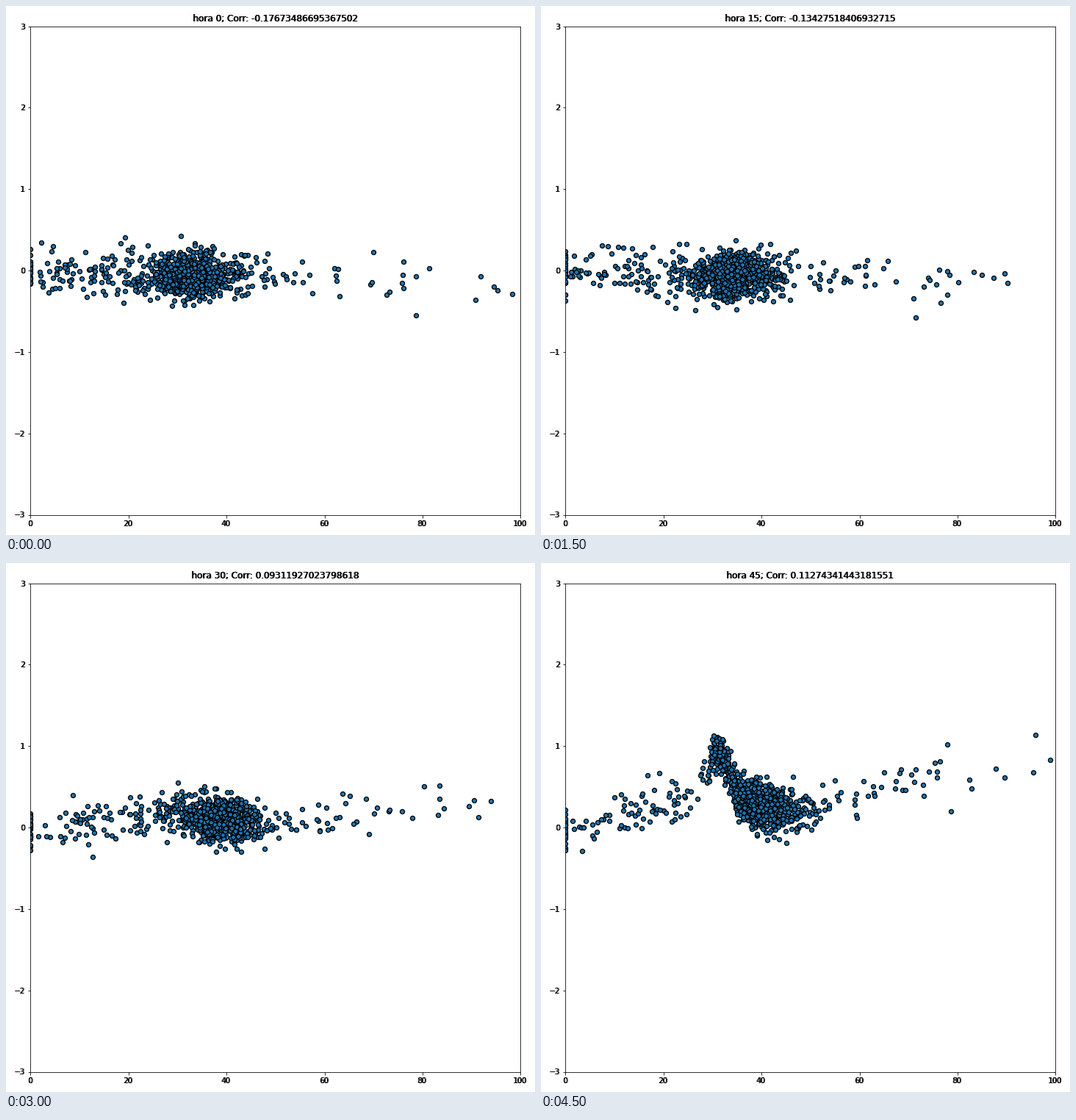
A matplotlib script for the animation above (5000 ms loop, 720 by 720 pixels).

```python
import numpy as np
import matplotlib.pyplot as plt
from matplotlib.animation import FuncAnimation

SIZE = 720
STEP = 5  # hours per picture
BOX = (33.4, 27.5, 667, 665)  # axes in pixels: left, bottom, width, height

CORR = ["-0.17673486695367502", "-0.16284107359214836", "-0.14899592846831902",
        "-0.13427518406932715", "-0.11955476773269091", "-0.01321774837465236",
        "0.09311927023798618", "0.11197137420252709", "0.2743531183376224",
        "0.11274341443181551"]


def ramp(v, start, end):
    """Smooth rise from 0 to 1."""
    u = np.clip((v - start) / (end - start), 0, 1)
    return u * u * (3 - 2 * u)


def cloud(hour):
    rng = np.random.default_rng(40 + hour)
    rise = ramp(hour, 20, 42)   # the whole cloud climbs
    peak = ramp(hour, 25, 45)   # a ridge grows on its left side
    cx = 33 + 6.5 * ramp(hour, 5, 40)
    cy = -0.06 + 0.33 * rise
    peak_x = 31

    def middle(x):
        """Mean height: tilted core, ridge, and tails on both sides."""
        slope = -0.01 * rise * np.clip(x - cx, -8, 10)
        ridge = 0.55 * peak * np.exp(-((x - peak_x) / 3.4) ** 2)
        core = cy + slope + ridge
        tail = -0.1 + rise * (0.5 + 0.014 * (x - 60))
        y = core + (tail - core) * ramp(x, 44, 62)
        return y * np.clip(x / 25, 0, 1)

    groups = [
        (cx + 3.6 * rng.standard_t(5, 740), 0.14),
        (rng.normal(peak_x + 0.8, 1.6, int(130 * peak)), 0.12),
        (1 + 27 * rng.random(115 - hour) ** 0.8, 0.16),
        (42 + 36 * rng.random(42 + hour // 2) ** 1.7, 0.15),
        (rng.uniform(76, 101, 9), 0.15 + 0.1 * rise),
        (np.zeros(24), 0.14),
    ]
    x = np.clip(np.concatenate([g for g, _ in groups]), 0, 100)
    spread = np.concatenate([np.full(len(g), s) for g, s in groups])
    y = middle(x) + spread * rng.standard_normal(len(x))
    return rng.permutation(np.column_stack([x, y]))


def add_axes(shift=0):
    left, bottom, width, height = BOX
    box = np.array([left + shift, bottom, width, height]) / SIZE
    return fig.add_axes(box, xlim=(0, 100), ylim=(-3, 3), facecolor="none")


fig = plt.figure(figsize=(10, 10), dpi=SIZE / 10)
ax = add_axes()
dots = ax.scatter([], [], s=36, c="#1f77b4", edgecolors="black", linewidths=1.3)

# A second set of labels, a pixel aside, makes the lettering heavier
labels = add_axes(-1)
labels.spines[:].set_visible(False)
labels.tick_params(color="none")


def draw(i):
    hour = i * STEP
    dots.set_offsets(cloud(hour))
    for a in (ax, labels):
        a.set_title(f"hora {hour}; Corr: {CORR[i]}")
    return dots, ax.title, labels.title


anim = FuncAnimation(fig, draw, frames=len(CORR), interval=500,
                     init_func=lambda: draw(0), repeat=True, repeat_delay=0)
plt.show()
```
